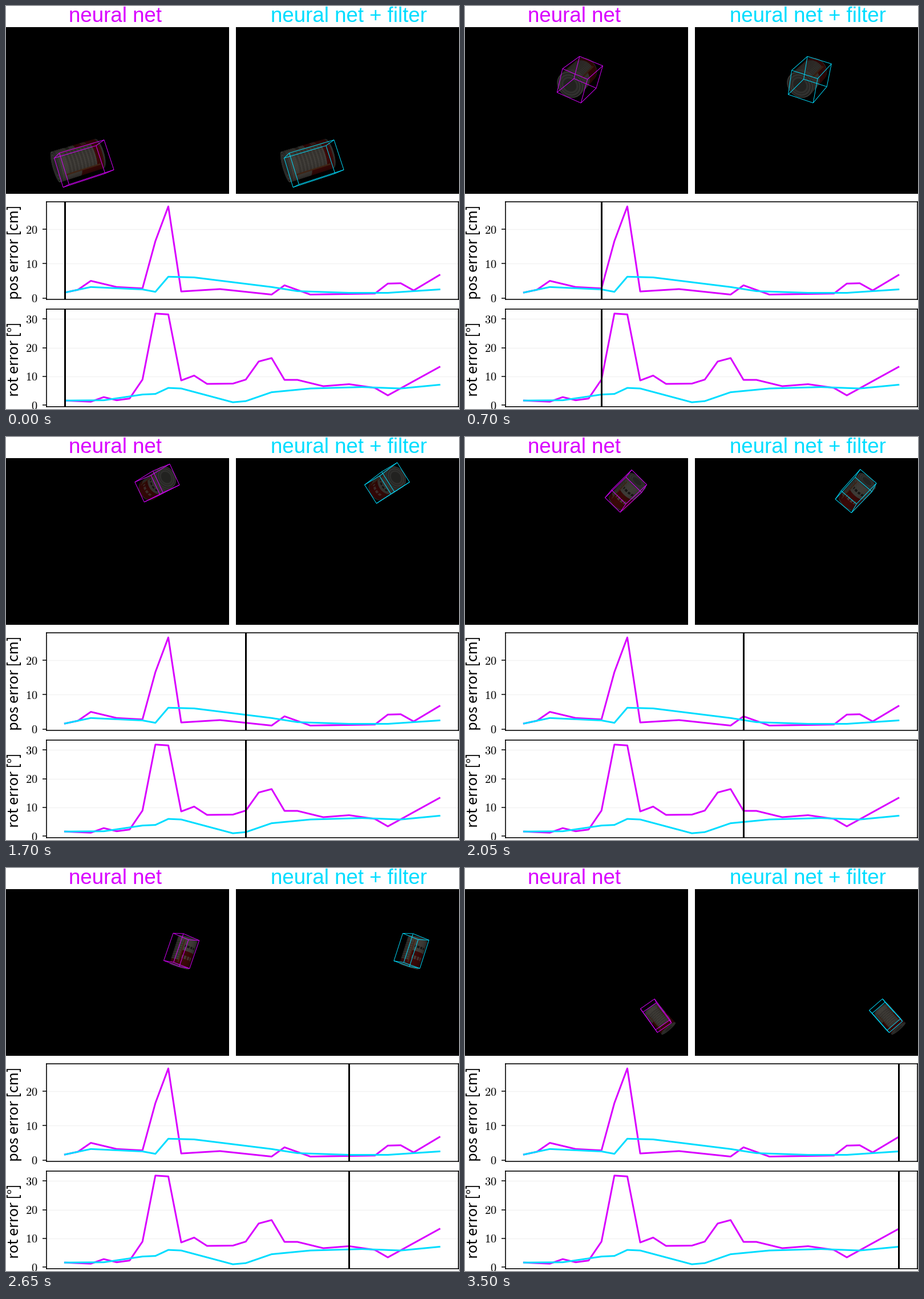
Recreate the animation shown at these times as a matplotlib script. Size 794x706 px, loop 3600 ms.

```python
import itertools

import numpy as np
import matplotlib.pyplot as plt
from matplotlib.animation import FuncAnimation
from matplotlib.collections import LineCollection, PolyCollection

W, H, DPI = 794, 706, 100
PX = 72 / DPI
STEPS, FRAMES, TICK = 30, 72, 50
MAGENTA, CYAN = "#d900ff", "#00ddff"
FOCAL, CENTRE = 680, (195.5, 183)
SIZE = np.array([101, 67, 67])  # can length and diameters in mm

plt.rcParams["mathtext.fontset"] = "cm"

k = np.arange(STEPS)


def curve(points):
    return np.interp(k, list(points), list(points.values()))


pos_net = curve({0: 1.6, 1: 2.4, 2: 5, 4: 3.2, 6: 2.8, 8: 26.7, 9: 1.9, 12: 2.6, 16: 1,
                 17: 3.7, 19: 1, 24: 1.3, 25: 4.2, 26: 4.3, 27: 2.2, 29: 6.7})
pos_net[7] = 16.6
pos_filter = curve({0: 1.6, 2: 3.2, 6: 2.5, 7: 1.8, 8: 6.2, 10: 6, 16: 3.2, 18: 2, 22: 1.5,
                    25: 1.5, 29: 2.5})
rot_net = curve({0: 1.6, 2: 1.2, 3: 2.8, 4: 1.7, 5: 2.3, 6: 8.9, 7: 31.9, 8: 31.6, 9: 8.6,
                 10: 10.3, 11: 7.4, 13: 7.5, 14: 8.9, 15: 15.2, 16: 16.4, 17: 8.8, 18: 8.8,
                 20: 6.6, 22: 7.3, 24: 6, 25: 3.4, 29: 13.3})
rot_filter = curve({0: 1.6, 3: 1.7, 6: 3.7, 7: 3.9, 8: 6, 9: 5.8, 13: 1, 14: 1.4, 16: 4.5,
                    19: 5.8, 23: 6.3, 26: 5.8, 29: 7.1})


def turn(degrees):
    """Rotation matrix for a rotation vector."""
    angle = np.radians(np.linalg.norm(degrees))
    if angle == 0:
        return np.eye(3)
    x, y, z = np.radians(degrees) / angle
    m = np.array([[0, -z, y], [z, 0, -x], [-y, x, 0]])
    return np.eye(3) + np.sin(angle) * m + (1 - np.cos(angle)) * m @ m


def tumble():
    """Orientation at each step; the columns are the can axis and two radii."""
    axis = np.array([-.895, .238, -.37])
    axis /= np.linalg.norm(axis)
    side = np.cross([.273, .964, -.19], axis)
    side /= np.linalg.norm(side)
    poses = [np.column_stack([axis, side, np.cross(axis, side)])]
    for t in k[:-1] + .5:
        poses.append(turn([-4.8, -3 - .2 * t, -7.4 + .08 * t]) @ poses[-1])
    return poses


# Free fall in camera space (mm; y down, z away from the camera)
can_pos = np.stack([-86 + 15 * k - .035 * k ** 2,
                    107.7 - 40.8 * k + 1.49 * k ** 2,
                    842 + 22.4 * k], -1)
can_rot = tumble()

# Both estimates share a drifting bias; the network alone also slips back and twists
filter_pos = can_pos + np.stack([12 - .9 * k, 8 - .65 * k, 0 * k], -1)
slip = 10 * np.clip(pos_net - pos_filter, 0, None)
net_pos = filter_pos * (1 + slip / filter_pos[:, 2])[:, None]
net_rot = [turn([0, 0, extra]) @ r for extra, r in zip(rot_net - rot_filter, can_rot)]


def project(pos, rot, pts):
    p = pos + (pts * SIZE) @ rot.T
    return CENTRE + FOCAL * p[..., :2] / p[..., 2:]


def signed_area(p):
    x, y = p[..., 0], p[..., 1]
    return (x * np.roll(y, -1, -1) - y * np.roll(x, -1, -1)).sum(-1)


CORNERS = np.array(list(itertools.product((-.5, .5), repeat=3)))
EDGES = [(i, j) for i, j in itertools.combinations(range(8), 2)
         if np.count_nonzero(CORNERS[i] != CORNERS[j]) == 1]


def box_lines(pos, rot):
    p = project(pos, rot, CORNERS)
    return [p[list(e)] for e in EDGES]


# Can surface: a grid along the axis and around it
NA, NT = 26, 52
A = np.linspace(-.5, .5, NA + 1)
T = np.linspace(-np.pi, np.pi, NT + 1)


def ring(a, t, radius=.5):
    return np.stack([a + 0 * t, radius * np.cos(t), radius * np.sin(t)], -1)


GRID = ring(*np.meshgrid(A, T, indexing="ij"))
ca, ct = np.meshgrid((A[1:] + A[:-1]) / 2, (T[1:] + T[:-1]) / 2, indexing="ij")


def label_colours():
    row, col = np.indices(ca.shape)
    back = np.pi - np.abs(ct)
    front = np.abs(ct + np.pi / 2)
    panel = back < .75
    tex = np.empty(ca.shape + (3,))
    tex[:] = 68, 65, 60
    tex[ca < np.where(panel, -.3, .02)] = 62, 10, 8
    tex[panel & (row % 2 == 0) & (np.abs(ca) < .3)] = 56, 53, 49
    tex[(np.abs(back - .8) < .07) & (np.abs(ca) < .38)] = 74, 42, 24
    tex[(front < .65) & (np.abs(ca - .19) < .05) & (col % 3 > 0)] = 26, 24, 22
    tex[(front < .6) & (np.abs(ca + .18) < .05) & (col % 3 > 0)] = 76, 58, 54
    tex[np.abs(ca) > .46] = 52, 52, 49
    return tex.reshape(-1, 3) / 255


TEX = label_colours()
RIMS = [(.5, 56), (.46, 32), (.42, 50), (.35, 36), (.32, 48), (.25, 34)]


def can_shape(pos, rot):
    p = project(pos, rot, GRID)
    quads = np.stack([p[:-1, :-1], p[1:, :-1], p[1:, 1:], p[:-1, 1:]], 2).reshape(-1, 4, 2)
    seen = signed_area(quads) > 0
    ray = rot.T @ pos / np.linalg.norm(pos)
    facing = -(np.cos(ct) * ray[1] + np.sin(ct) * ray[2])
    shade = (.55 + .45 * np.clip(facing, 0, 1)).reshape(-1, 1)
    verts, colours = list(quads[seen]), list((TEX * shade)[seen])
    for end, (radius, grey) in itertools.product((-.5, .5), RIMS):
        disc = project(pos, rot, ring(end, T[:-1], radius))
        if signed_area(disc) * end < 0:
            verts.append(disc)
            colours.append(np.array([grey, grey, grey * .95]) / 255)
    return verts, colours


fig = plt.figure(figsize=(W / DPI, H / DPI), dpi=DPI, facecolor="white")


def pane(x0, y0, x1, y1):
    return fig.add_axes([x0 / W, 1 - y1 / H, (x1 - x0) / W, (y1 - y0) / H])


def write(x, y, s, size, **kw):
    fig.text(x / W, 1 - y / H, s, fontsize=size * PX, ha="center", va="baseline",
             rotation_mode="anchor", **kw)


def view(x0, colour):
    top, bottom = 36.6, 329.4
    ax = pane(x0, top, x0 + 391, bottom)
    ax.set(xlim=(0, 391), ylim=(bottom, top), xticks=[], yticks=[], facecolor="black")
    for spine in ax.spines.values():
        spine.set_visible(False)
    body = ax.add_collection(PolyCollection([], linewidths=.3), autolim=False)
    box = ax.add_collection(LineCollection([], colors=colour, linewidths=.95 * PX), autolim=False)
    return body, box


def chart(y0, y1, ylim, ticks, label, net_err, filter_err):
    ax = pane(70.6, y0, 792.6, y1)
    ax.set(xlim=(-1.45, 30.45), ylim=ylim, xticks=[])
    ax.set_yticks(ticks, [f"${t}$" for t in ticks])
    ax.tick_params(axis="y", length=7 * PX, width=1.5 * PX, pad=8 * PX, labelsize=20.5 * PX)
    ax.grid(axis="y", color="#f3f3f3", linewidth=1.4 * PX)
    ax.set_axisbelow(True)
    for spine in ax.spines.values():
        spine.set_linewidth(1.6 * PX)
    ax.plot(net_err, color=MAGENTA, linewidth=3 * PX)
    ax.plot(filter_err, color=CYAN, linewidth=3 * PX)
    write(22, (y0 + y1) / 2 + 2.5, label, 25.2, rotation=90, family="Noto Sans CJK JP")
    return ax.axvline(0, color="black", linewidth=3 * PX, zorder=5)


write(192, 27.5, "neural net", 36.6, color=MAGENTA, family="Liberation Sans")
write(601.5, 27.5, "neural net + filter", 36.6, color=CYAN, family="Liberation Sans")
views = [view(0, MAGENTA) + (net_pos, net_rot), view(403, CYAN) + (filter_pos, can_rot)]
cursors = [
    chart(343, 514, (-.41, 28.05), (0, 10, 20), "pos error [cm]", pos_net, pos_filter),
    chart(531, 702, (-.55, 33.45), (0, 10, 20, 30), "rot error [°]", rot_net, rot_filter),
]


def update(frame):
    step = int((frame + .5) * STEPS / FRAMES)
    verts, colours = can_shape(can_pos[step], can_rot[step])
    for body, box, pos, rot in views:
        body.set_verts(verts)
        body.set_facecolor(colours)
        body.set_edgecolor(colours)
        box.set_segments(box_lines(pos[step], rot[step]))
    for cursor in cursors:
        cursor.set_xdata([step, step])
    return []


anim = FuncAnimation(fig, update, frames=FRAMES, interval=TICK, repeat=True, blit=False)
plt.show()
```
